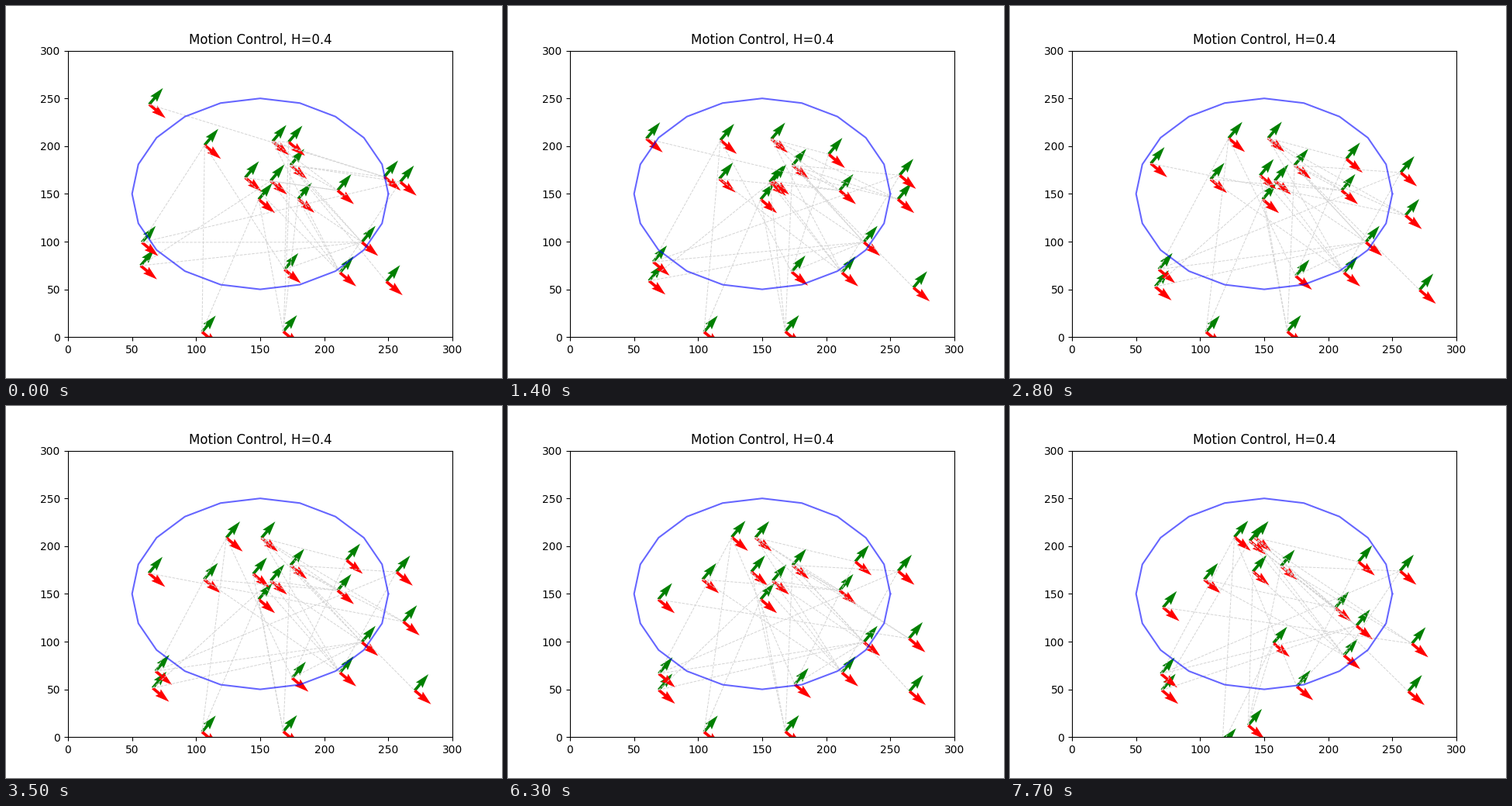
A matplotlib script for the animation above (8 s loop, 640x480 px).

```python
import numpy as np
import matplotlib.pyplot as plt
from matplotlib.animation import FuncAnimation
from matplotlib.collections import LineCollection

TICKS_PER_STEP = 7       # 100 ms ticks for each simulation step
LAST_STEP = 11
WAKE = 9                 # step at which the resting agents set off
PULL, DRIFT = 0.62, 0.85  # what is left of each motion after one step


class Agent:
    """Falls quickly towards its goal while a slower drift dies out."""

    def __init__(self, start, goal, drift=(0, 0), wake=0):
        self.goal, self.drift = np.array(goal), np.array(drift)
        self.pull = np.array(start) - self.goal - self.drift
        self.wake = wake

    def at(self, step):
        t = max(step - self.wake, 0)
        return self.goal + self.pull * PULL ** t + self.drift * DRIFT ** t


def resting(start, goal):
    return Agent(start, goal, wake=WAKE)


agents = dict(
    A=Agent((63.4, 243.7), (77, 114), (-36, 130)),
    B=Agent((106.6, 201), (128, 209.5), (-7, 0)),
    C=Agent((159.7, 205), (137, 209), (34, 0)),
    D=Agent((172.2, 204.3), (225.3, 183.5), (-9, 0)),
    E=resting((173.7, 180), (156.5, 178.5)),
    F=Agent((138.3, 167), (103, 165)),
    G=resting((158.2, 163.7), (126.5, 231.6)),
    H=resting((148.8, 144.2), (162.4, 69.8)),
    I=Agent((179.6, 144.6), (141, 173.5)),
    J=resting((210.4, 153.6), (202.3, 123.9)),
    K=Agent((246.9, 167.8), (267, 84), (-10, 83)),
    L=Agent((259.3, 162.5), (256, 174)),
    M=resting((229.3, 99.4), (217.4, 127.3)),
    N=Agent((57.7, 99.2), (69.5, 66)),
    O=Agent((56.7, 74.8), (72.5, 49), (-14, 0)),
    P=Agent((169, 70.8), (175.5, 47), (0, 36)),
    Q=resting((212.2, 67.5), (212.2, 96.9)),
    R=Agent((248.4, 58.2), (255, 47.8), (46, 0)),
    S=resting((104.6, 5.4), (125.2, -16.4)),
    T=resting((168, 5.8), (118.5, 16.4)),
)

LINKS = ("AK NM OM NB SB SH TH TI TE NL OG BP FJ FQ GQ CQ IQ CJ EJ EL ER "
         "GJ GM DC PM PD QL CK EK CM EM").split()

names = list(agents)
pairs = [[names.index(a), names.index(b)] for a, b in LINKS]


def positions(step):
    return np.array([agent.at(step) for agent in agents.values()])


fig, ax = plt.subplots(figsize=(6.4, 4.8), dpi=100)
fig.subplots_adjust(left=0.125, right=0.9, bottom=0.11, top=0.88)
ax.set_title("Motion Control, H=0.4")

start = positions(0)


def arrows(angle, color):
    ones = np.ones(len(names))
    a = np.radians(angle)
    return ax.quiver(*start.T, ones * np.cos(a), ones * np.sin(a), color=color,
                     scale=18, scale_units="width", width=0.0075)


quivers = [arrows(50, "green"), arrows(-40, "red")]
links = LineCollection(start[pairs], colors="lightgray", linewidths=0.7,
                       linestyles="--", zorder=1.8)
ax.add_collection(links)

theta = np.linspace(0, 2 * np.pi, 21)
ax.plot(150 + 100 * np.cos(theta), 150 + 100 * np.sin(theta), color="blue", alpha=0.6)
ax.set_xlim(0, 300)
ax.set_ylim(0, 300)


def update(tick):
    pos = positions(min(tick // TICKS_PER_STEP, LAST_STEP))
    for quiver in quivers:
        quiver.set_offsets(pos)
    links.set_segments(pos[pairs])
    return [*quivers, links]


anim = FuncAnimation(fig, update, frames=80, interval=100, repeat=True, repeat_delay=0)
plt.show()
```
